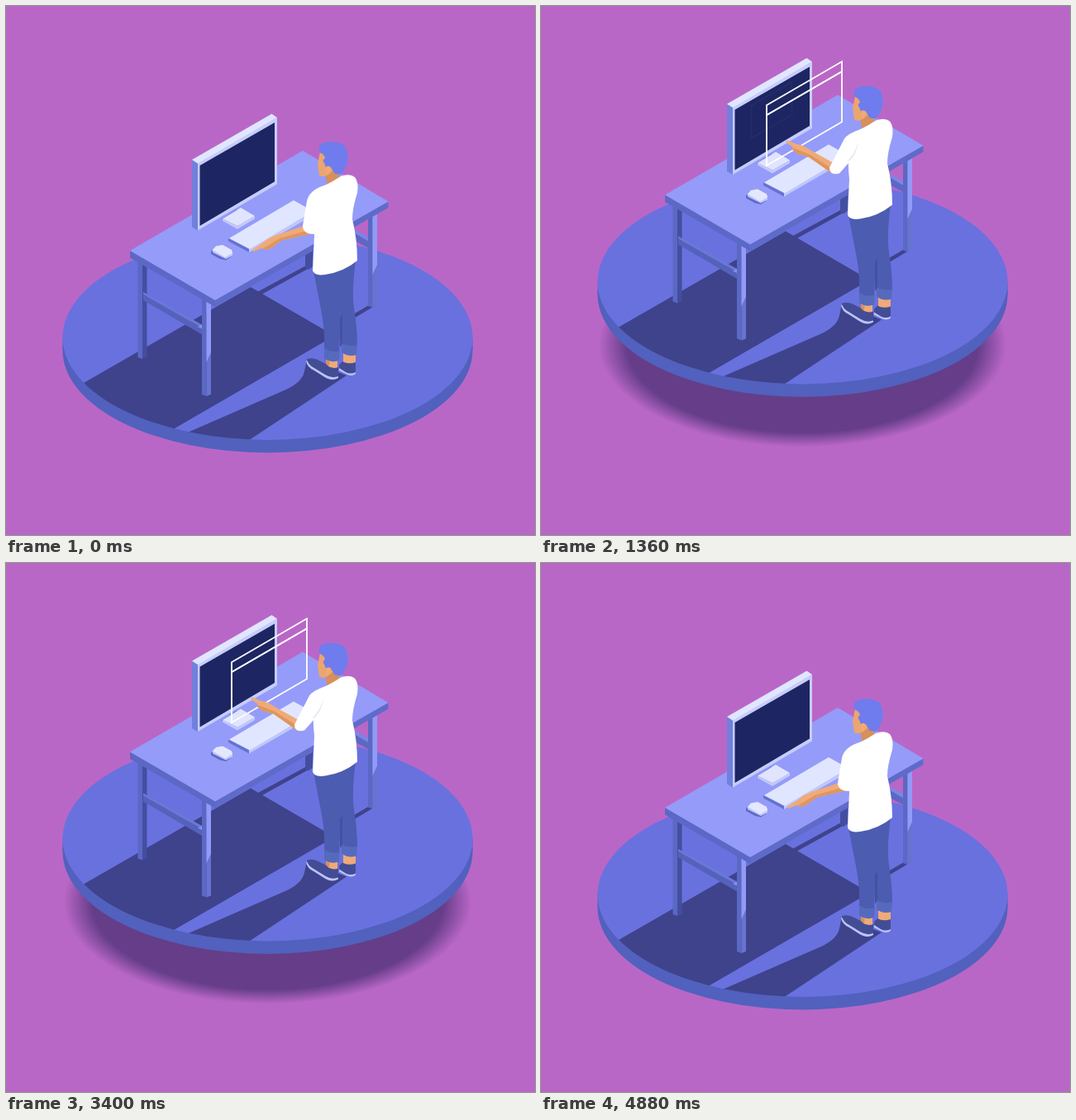
An HTML page with a canvas that plays this animation: 640x640 px, repeating every 4.96 s.

```html
<!DOCTYPE html>
<html lang="en">
<head>
<meta charset="utf-8">
<title>Standing desk</title>
<style>
html, body { margin: 0; width: 100%; height: 100%; overflow: hidden; background: #b967c7; }
canvas { display: block; width: 100vw; height: 100vh; }
</style>
</head>
<body>
<canvas id="stage" width="640" height="640"></canvas>
<script>
const ctx = document.getElementById('stage').getContext('2d');
const LOOP = 4960, LIFT = 67.5;

const clamp = v => Math.min(1, Math.max(0, v));
const span = (t, from, to) => clamp((t - from) / (to - from));
const smooth = v => v * v * (3 - 2 * v);
const cubic = v => v < .5 ? 4 * v ** 3 : 1 - 4 * (1 - v) ** 3;
const lerp = (a, b, k) => a + (b - a) * k;

function fill(color, d) {
  ctx.fillStyle = color;
  ctx.fill(new Path2D(d));
}

function ellipse(color, x, y, rx, ry) {
  ctx.fillStyle = color;
  ctx.beginPath();
  ctx.ellipse(x, y, rx, ry, 0, 0, Math.PI * 2);
  ctx.fill();
}

function groundShadow() {
  const soft = ctx.createRadialGradient(0, 0, 212, 0, 0, 247);
  soft.addColorStop(0, '#653d89');
  soft.addColorStop(1, 'rgba(101, 61, 137, 0)');
  ctx.save();
  ctx.translate(316.5, 410);
  ctx.scale(1, .5);
  ellipse(soft, 0, 0, 247, 247);
  ctx.restore();
}

function platform() {
  ellipse('#5161bd', 316.5, 416.5, 248, 124);
  ctx.fillRect(68.5, 401, 496, 15.5);
  ellipse('#6971df', 316.5, 401, 248, 124);
  ctx.save();
  ctx.clip();
  fill('#3e438c', 'M80 464L296 340 397.5 399 204 511 190 530 80 500Z');
  fill('#3e438c', 'M304 346L363 314 367 317 309 349Z');
  fill('#3e438c', 'M384 394L439 362 444 364 389 397Z');
  fill('#3e438c', 'M215 518L332 467Q358 457 361 442L364 428 412 447 290 528Z');
  ctx.restore();
}

function leg(x, top, bottom, right, lit) {
  fill('#5b68c4', `M${x} ${top}h5.5V${bottom}l-5.5 -2Z`);
  fill(right, `M${x + 5.5} ${top}h5.5V${bottom - 2}l-5.5 2Z`);
  if (lit) fill('#929af8', `M${x + 5.5} ${top}h5.5V${lit - 12}l-5.5 12Z`);
}

function desk() {
  fill('#434e9f', 'M362 296H371V315L366 319 362 317Z');
  fill('#7b85e6', 'M422 270L439 280V285L422 275Z');
  fill('#5b68c4', 'M422 275L439 285V293L422 284Z');
  leg(438, 250, 365, '#6773ce', 325);
  leg(159.5, 310, 427, '#434e9f');
  fill('#6c78d6', 'M166 346L238 386V390L166 349Z');
  fill('#5562bb', 'M166 349L238 390V398L166 356Z');
  fill('#8790ee', 'M232 388L238 385V391Z');
  leg(237, 354, 472, '#6773ce', 431);

  fill('#5c68c5', 'M150 296L253 355V364L150 304.5Z');
  fill('#5f6bc9', 'M253 355L462.5 236.5V244L253 364Z');
  fill('#959bf9', 'M150 296L359 175 462.5 236.5 253 356Z');
}

function equipment() {
  fill('#6873d4', 'M261 258L279 246 281 269 263 260Z');
  fill('#c2c8fa', 'M262 257.5L280 266 301 254V257.5L280 270 262 260Z');
  fill('#e0e5fd', 'M262 257.5L284 244 301 254 280 266Z');
  fill('#7180dc', 'M225 186L232 190V271.5L225 267.5Z');
  fill('#c6cdfc', 'M232 190L328 135V215.5L232 271.5Z');
  fill('#e0e6ff', 'M225 186L321.5 130.5 328 135 232 190.5Z');
  fill('#1d2662', 'M234.5 193L325 141V212.5L234.5 266Z');

  fill('#6571ce', 'M269 281L294 294V298L269 284.5Z');
  fill('#bfc7fb', 'M294 294L372 249V253L294 298Z');
  fill('#e0e6ff', 'M270 281L348 235 372 248.5 295 294Z');

  fill('#5f6bc8', 'M248 297L252 294 273 303 266 307.5 259 306 248 300Z');
  fill('#bfc7fb', 'M250 294L274 297V302L266 306 250 298Z');
  fill('#e4e8ff', 'M250 295L254 290.5 262 289 273 295 274 299 265 304Z');
}

// Panels slide out of the screen along the depth axis; out = 0 hidden, 1 in place.
function panel(x, y, w, h, out, travel = 18) {
  if (out <= 0) return;
  const back = travel * (1 - out), rise = w * .58;
  ctx.save();
  ctx.globalAlpha = clamp(out * travel / 18);
  ctx.translate(x - back, y - back * .6);
  ctx.strokeStyle = '#fff';
  ctx.lineWidth = 1.8;
  ctx.stroke(new Path2D(`M0 0L${w} ${-rise}V${h - rise}L0 ${h}Z`));
  ctx.restore();
}

function panels(t) {
  const shown = (a, b, c, d) => smooth(span(t, a, b)) - smooth(span(t, c, d));
  panel(273, 199.5, 91, 61, shown(260, 540, 4490, 4770));
  panel(273, 187.5, 91, 12, shown(320, 600, 4440, 4720));
  panel(284, 205.5, 49, 39.5, shown(1340, 1600, 2750, 3010), 30);
  const red = shown(1480, 1740, 2300, 2540);
  if (red > 0) {
    ctx.save();
    ctx.globalAlpha = red;
    ctx.translate(-18 * (1 - red), -10.4 * (1 - red));
    fill('#ef3f63', 'M289 209.5L320 191.5V208L289 226Z');
    ctx.restore();
  }
}

// Cuff outer, cuff bend, cuff inner, wrist, fingertip (x, y each), then raise and lean.
const REST = [359, 266, 359, 276, 373, 276, 331, 280, 299, 296, 0, 0];
const SWIPE = [349, 263, 349, 273, 361, 270, 326, 243.5, 299, 225, 1, 0];
const POINT = [349, 263, 349, 273, 361, 270, 325, 246, 296.5, 231.5, 1, 0];
const PRESS = [340, 248, 341, 263, 351, 262, 319, 224, 295, 210, 1, 1];
const KEYS = [
  [0, REST], [760, REST], [1160, POINT], [1480, POINT], [1800, PRESS],
  [2220, PRESS], [2560, SWIPE], [2860, SWIPE], [3260, POINT],
  [4060, POINT], [4480, REST], [LOOP, REST]
];

function poseAt(t) {
  const i = KEYS.findIndex(key => key[0] > t);
  const [from, a] = KEYS[i - 1], [to, b] = KEYS[i];
  const k = smooth(span(t, from, to));
  return a.map((v, n) => lerp(v, b[n], k));
}

function limb(color, x, y, dx, dy, points) {
  const len = Math.hypot(dx, dy), ux = dx / len, uy = dy / len;
  ctx.fillStyle = color;
  ctx.beginPath();
  for (const [along, off] of points) {
    ctx.lineTo(x + dx * along - uy * off, y + dy * along + ux * off);
  }
  ctx.fill();
}

function arm([ox, oy, bx, by, ix, iy, wx, wy, tx, ty, raise]) {
  const ex = (ox + ix) / 2 + 1, ey = (oy + iy) / 2 - 1;
  const fore = [wx - ex, wy - ey], hand = [tx - wx, ty - wy];
  limb('#f0aa78', ex, ey, ...fore, [[0, 6], [1, 4], [1, -4], [0, -6]]);
  limb('#de965f', ex, ey, ...fore, [[0, -1], [1, -1], [1, -4], [0, -6]]);
  limb('#f0aa78', wx, wy, ...hand, [
    [-.05, 4], [.35, 5], [.6, 3.2], [1, 1.6], [1, -1],
    [.68, -2], [.64, -5.5], [.4, -7], [-.05, -4]
  ]);
  limb('#de965f', wx, wy, ...hand, [[-.05, -1], [.35, -2], [.65, -3], [.64, -5.5], [.4, -7], [-.05, -4]]);

  fill('#fff', `M388 216Q${lerp(367, 371, raise)} 222 ${lerp(364, 367, raise)} ${lerp(236, 228, raise)}` +
    `L${ox} ${oy}Q${bx} ${by} ${ix} ${iy}L384 ${lerp(262, 244, raise)}Z`);
  ctx.globalAlpha = raise;
  fill('#e6e6f1', 'M384 232Q380 246 370 256L374 254Q382 246 384 232Z');
  ctx.globalAlpha = 1;
}

function legsAndShoes() {
  fill('#efaa78', 'M408 418H423V434L408 432Z');
  fill('#efaa78', 'M387 425H401V439L387 436Z');
  fill('#d98f5c', 'M387 428L392 431 390 436 387 435Z');
  fill('#bcc4fa', 'M403 436L423 440V445Q418 449 411 445L403 441Z');
  fill('#434d95', 'M403 434L407 430Q414 434 423 431V443Q417 446 411 443L403 438Z');
  fill('#bcc4fa', 'M363 429Q364 437 373 441L384 448Q394 455 402 450V445L370 430Z');
  fill('#434d95', 'M364 427Q373 425 379 429L387 433Q393 440 402 437V448Q394 451 386 446L373 438Q365 434 364 427Z');
  fill('#4c5cb0', 'M371 315L423 308Q418 345 421 366Q425 388 425 412L407 410 405 370 403 420 385 417Q386 395 382 372Z');
  fill('#4351a0', 'M404 377L407 372V410L404 412Z');
  fill('#566abd', 'M406 408Q416 413 425 410L424 422Q414 425 406 419Z');
  fill('#566abd', 'M385 414Q393 420 404 417L403 429Q393 432 385 427Z');
}

function head(lean) {
  ctx.save();
  ctx.translate(-3.5 * lean, lean);
  fill('#d78f5b', 'M386 198L402 198 404 211 388 215Z');
  fill('#eba56f', 'M380 176L378 187 377 191 379 205Q384 208 390 204L398 197 392 180Z');
  fill('#6f7ced', 'M380 168Q386 163 396 164.5Q407 165 411 171Q415 181 413 190Q409 200 405 204L398 203Q395 199 393 195L387 195 385 190Q382 187 386 184Q385 179 379 177Q378 171 380 168Z');
  fill('#f0aa78', 'M387 195Q391 192 393 196Q393 202 388 204Z');
  ctx.restore();
}

function man(t) {
  const pose = poseAt(t);
  legsAndShoes();
  head(pose[11]);
  fill('#fff', 'M386 217Q396 212 405 206Q416 202 422 207Q427 213 425 226Q419 245 419 258Q425 282 425 308Q408 322 386 325Q373 327 371 320L373 277Q370 245 374 226Z');
  arm(pose);
}

function draw(now) {
  const t = now % LOOP;
  const lift = cubic(span(t, 0, 600)) - cubic(span(t, 4456, 4880));
  ctx.fillStyle = '#b967c7';
  ctx.fillRect(0, 0, 640, 640);
  groundShadow();
  ctx.save();
  ctx.translate(0, -LIFT * lift);
  platform();
  desk();
  equipment();
  panels(t);
  man(t);
  ctx.restore();
  requestAnimationFrame(draw);
}
requestAnimationFrame(draw);
</script>
</body>
</html>
```
